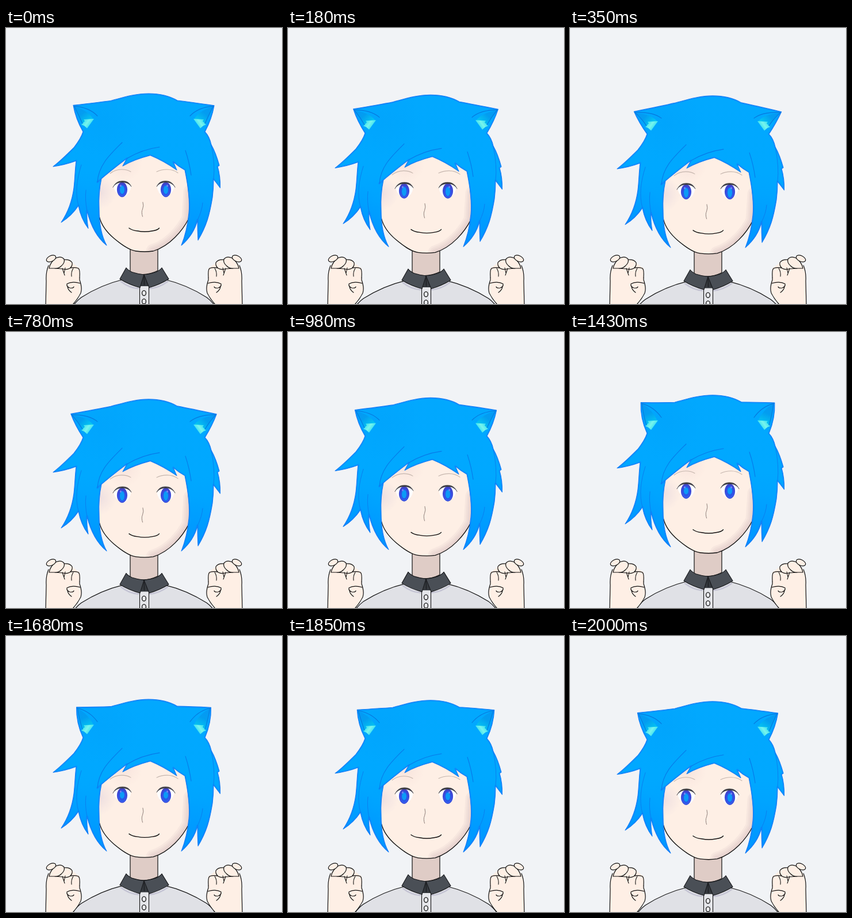
These frames come from a looping animation (480 px wide and 480 px high, 2.02 s). An HTML page with a canvas:

```html
<!DOCTYPE html>
<html lang="en">
<head>
<meta charset="utf-8">
<title>Idle character</title>
<style>
html, body { margin: 0; width: 100%; height: 100%; overflow: hidden; background: #f1f3f6; }
canvas { display: block; width: 480px; height: 480px; }
</style>
</head>
<body>
<canvas id="stage" width="480" height="480"></canvas>
<script>
const ctx = document.getElementById('stage').getContext('2d');
const LOOP = 2020;
const INK = '#111111', SKIN = '#feefe5', EDGE = '#147cf6';
ctx.lineJoin = ctx.lineCap = 'round';

function shape(d, fill, stroke, width = 1.2) {
  const path = typeof d === 'string' ? new Path2D(d) : d;
  if (fill) { ctx.fillStyle = fill; ctx.fill(path); }
  if (stroke) { ctx.strokeStyle = stroke; ctx.lineWidth = width; ctx.stroke(path); }
}

function line(d, color = INK, width = 1.2) { shape(d, null, color, width); }

function oval(x, y, rx, ry, fill, stroke, width, tilt = 0) {
  const path = new Path2D();
  path.ellipse(x, y, rx, ry, tilt, 0, Math.PI * 2);
  shape(path, fill, stroke, width);
}

function shifted(dy, draw) {
  ctx.save();
  ctx.translate(0, dy);
  draw();
  ctx.restore();
}

// Draws a part, then its reflection; sum is twice the mirror axis
function pair(sum, draw) {
  draw();
  ctx.save();
  ctx.translate(sum, 0);
  ctx.scale(-1, 1);
  draw();
  ctx.restore();
}

function linear(x0, y0, x1, y1, ...colors) {
  const g = ctx.createLinearGradient(x0, y0, x1, y1);
  colors.forEach((c, i) => g.addColorStop(i / (colors.length - 1), c));
  return g;
}

function glow(x, y, r, rgb, alpha) {
  const g = ctx.createRadialGradient(x, y, 0, x, y, r);
  g.addColorStop(0, `rgba(${rgb},${alpha})`);
  g.addColorStop(1, `rgba(${rgb},0)`);
  ctx.fillStyle = g;
  ctx.fillRect(x - r, y - r, r * 2, r * 2);
}

function body() {
  shape('M205 437C180 443 152 455 131 468.5Q122 475 112 489L368 489Q358 475 349 468.5C328 455 300 443 275 437Z',
    '#e0e1e6', INK);
  line('M200 441Q214 452 230 453M281 441Q266 452 250 453', 'rgba(130,125,165,.3)', 2.5);
  shape('M232.5 448V490H248.5V448Z', '#e5e6ea', INK, 1.1);
  for (const y of [461, 475.5]) oval(240, y, 3.4, 4.4, '#e9eaed', INK, 1.3);
  shape('M216 380V424Q240 434 264 422V380Z', '#dfccc6', INK);
  shape('M234 428L233 449L249 449L246 428Z', '#34383d');
  shape('M209 417Q212 421 219 424.5Q230 428 240 429L233 451.5Q213 446 198 436.5Z', '#4a4f56', '#18191c', 1.1);
  shape('M271 417Q268 421 261 424.5Q251 428 240 429L249 451.5Q268 446 283 436.5Z', '#4a4f56', '#18191c', 1.1);
  line('M240 429L240.5 447', '#18191c', 1);
}

const JAW_RIGHT = 'C269 384 283 375 294 364C305 353 312 343 318 331';
const JAW = 'M162.5 329C166 343 175 355 188 366C200 376 213 386 226 388Q241 390 256 388' + JAW_RIGHT;
const FACE = new Path2D(JAW + 'L321 230L240 200L158 230Z');

function eye(s) {
  shape('M187 275Q192 267 202 267Q213 267 217.5 275Q216 289 205 294Q191 292 187 275Z', '#ffffff');
  oval(202, 281, 8.6, 12.8, linear(0, 268, 0, 294, '#4040c0', '#3c4ce0', '#3560ee'), '#4149cf', 1);
  oval(202, 281.5 + s * .6, 5.6, 9.6, '#2758e8');
  oval(202, 281.5 + s, 4, 7.2 + s * 1.3, '#0c9af6');
  oval(199.5, 274.5, 1.2, 2, '#7d8bf5');
  shape('M186 277C190 268.5 196 265.8 203 266C211 266 215.5 270 218 276C214 270.5 209 268.5 202 268.6C195 268.5 190 271 186 277Z',
    '#3a3a42', '#3a3a42', .5);
}

function face(s) {
  shape(FACE, SKIN);
  ctx.save();
  ctx.clip(FACE);
  glow(162, 285, 30, '205,190,215', .32);
  glow(205, 235, 32, '235,205,205', .3);
  for (const w of [7, 13, 19, 25]) line('M256 388' + JAW_RIGHT + 'L321 285', 'rgba(185,160,165,.1)', w);
  ctx.restore();
  line(JAW, INK, 1.3);
  line('M181 253Q190 246 201 246Q211 246 217 250M262 250Q270 246 280 246Q291 246 299 252', '#c5b6ae', 1.1);
  pair(480, () => eye(s));
  line('M238 303Q240 309 237.5 315Q235 320 237.5 328', '#8d807b', 1);
  line('M214 348Q219 352 229 353Q241 355.5 254 353Q263 352 266.5 348', INK, 1.4);
}

function hair(s) {
  const dx = 6.4 * s, dy = 7.8 * s;
  const tip = 134.4 + dy, bend = 158 + 3.5 * s, brow = 129.5 + 2.5 * s;
  const outline = `M182 126.5Q160 ${brow} ${117 - dx} ${tip}
    Q${121 - s} ${bend} 134 180.5C131 190 125 199 118 208C107 219 95 231 82 241
    Q103 238 122 231C120 246 120 261 118 278C115 301 108 320 96 338Q114 327 126 309
    C129 325 135 338 143 348.5Q140 332 141 318C147 343 159 365 175 378
    C164 358 162 336 162 314C161 294 163 276 166 262L159 268Q182 248 210 227L203 240
    Q222 229 251 221.5Q274 231 297 247L291 233Q300 241 311 247
    C316 271 320 302 318 322Q315 353 305 378Q327 359 333 334Q333 352 334 369
    C349 344 354 325 359 295Q361 279 361 263L372.5 278Q373 258 368 241L371 239
    Q365 217 357 203Q354 189 346 180.5Q${358 + s} ${bend} ${362 + dx} ${tip + .5}
    Q320 ${brow - 1} 298 126C286 119 271 114 248 114C224 114 203 121 182 126.5Z`;
  const path = new Path2D(outline);
  shape(path, linear(0, 114, 0, 380, '#02a8fe', '#00a8ff', '#009cff'));
  ctx.save();
  ctx.clip(path);
  glow(168, 160, 65, '0,145,240', .14);
  glow(110, 320, 55, '0,130,255', .2);
  glow(155, 360, 60, '0,130,255', .2);
  glow(325, 350, 65, '0,130,255', .22);
  line(path, 'rgba(20,110,255,.25)', 4);
  ctx.restore();
  line(path, EDGE, 1.1);

  line('M202 199C181 220 161 238 159 268M267 207Q237 211 210 227M312 213Q319 234 322 256', '#0879e8', 1.1);
  line('M131 238C123 264 120 286 126 309M141 318Q137 298 139 282M333 334Q341 318 342 304M357 203Q364 237 361 263', '#0a80ef', 1);

  pair(479, () => ear(117 - dx, tip, s));
}

function ear(x, y, s) {
  const inner = `M${x + 2} ${y + 2}Q${126 - s} ${151 + 4 * s} 133 167L141 174L152 159
    Q${144 - s} ${144 + 3 * s} ${x + 2} ${y + 2}Z`;
  shape(inner, linear(x, y, 143, 168, '#0597f6', '#039df0', '#05cdf2'));
  shape('M131 168L137 162L135 159L153 158L141 174.5L136 170Z', linear(134, 160, 148, 170, '#38dff1', '#78f4ec', '#2fdcf2'));
  line(`M${x + 1} ${y + 1.5}Q${145 - s} ${138 + 4 * s} 159 153M${x + 2} ${y + 2}Q${126 - s} ${151 + 4 * s} 133 166`, '#0877dd', 1.1);
}

function hand() {
  shape('M69 490L70 440Q69 423 76 411Q91 400 112 406L128 418L128 438Q133 452 130 461Q125 471 112 485Z', SKIN);
  line('M69 484L70 440Q69 425 74 413M128 434L128 438Q133 452 130 461Q125 471 116 481');
  shape('M128 434Q130 421 126 418Q117 415 108 417L101 421L103 431L114 436Z', SKIN);
  line('M128 434Q129 421 126 418Q117 415 106 419');
  shape('M86 418Q92 407 101 403Q111 402 115 408Q116 414 111 418Q105 421 99 419Z', SKIN, INK);
  shape('M75 418Q77 407 87 400Q96 396 101 402Q103 408 96 414Q91 419 84 418Z', SKIN, INK);
  oval(78.5, 401, 8.8, 5, SKIN, INK, 1.2, -.45);
  line('M98 418L102 430M103 417L101 426M117 418Q113 424 114 432', INK, 1.1);
  line('M129 444Q115 440 106 445Q105 450 111 452Q117 453 118 450M107 449Q107 455 114 460', INK, 1.2);
}

function draw(now) {
  const s = Math.sin(now % LOOP / LOOP * Math.PI * 2);
  ctx.fillStyle = '#f1f3f6';
  ctx.fillRect(0, 0, 480, 480);
  shifted(3.9 * s, body);
  shifted(4.4 * s, () => { face(s); hair(s); });
  pair(480, hand);
}

let start;
function tick(now) {
  start ??= now;
  draw(now - start);
  requestAnimationFrame(tick);
}
draw(0);
requestAnimationFrame(tick);
</script>
</body>
</html>
```
